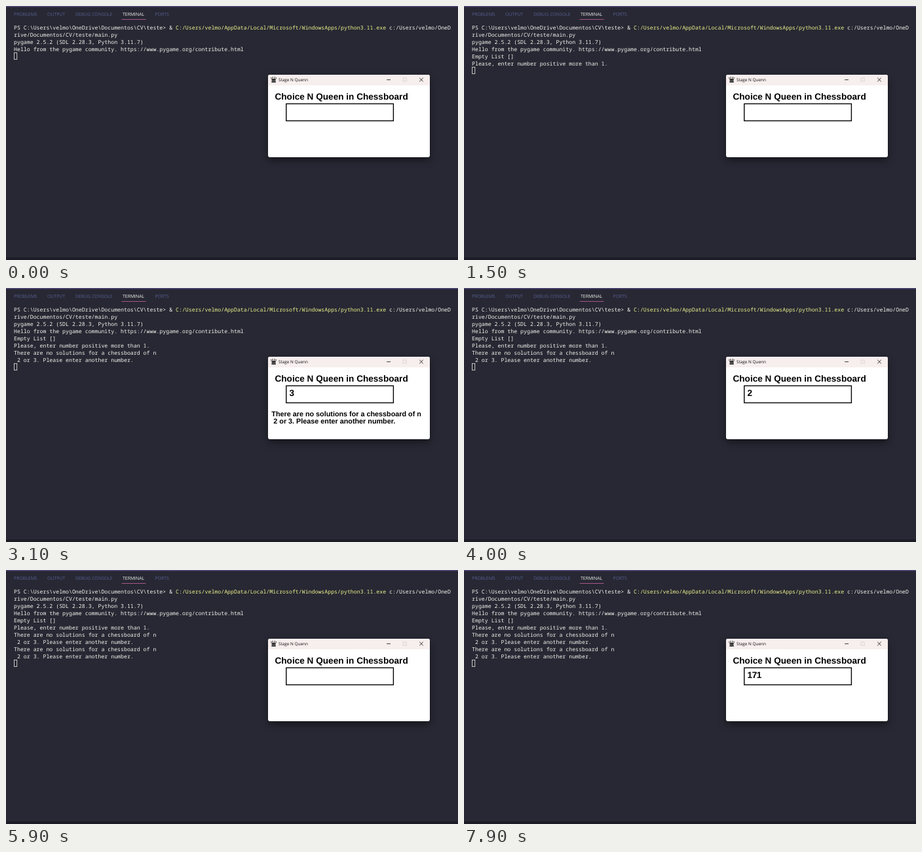
An HTML page for the animation above (8 s loop, 690 by 388 pixels).

```html
<!DOCTYPE html>
<html lang="en">
<head>
<meta charset="utf-8">
<title>N Queen terminal session</title>
<style>
  html, body { margin: 0; width: 100%; height: 100%; overflow: hidden; background: #272833; }
  svg { display: block; width: 690px; height: 388px; }
  text { white-space: pre; text-rendering: geometricPrecision; }
  .tabs { font: 6.9px "Open Sans", "Noto Sans", sans-serif; fill: #565f92; }
  .tabs .active { fill: #f2f2ee; }
  .terminal { font: 8.24px "Noto Sans Mono", "DejaVu Sans Mono", monospace; fill: #f4f4ee; }
  .terminal .command { fill: #eef28d; }
  .caption { font: 6.4px "Open Sans", "Noto Sans", sans-serif; fill: #111; }
  .game { font: bold 13.6px "Liberation Sans", Arial, sans-serif; fill: #000; }
  .game .small { font-size: 10.8px; }
  #entry { letter-spacing: -.5px; }
  .shadow { filter: drop-shadow(0 5px 6px rgba(0, 0, 0, .45)); }
</style>
</head>
<body>
<svg viewBox="0 0 690 388">
  <rect width="690" height="388" fill="#272833"/>
  <rect width="690" height="1.4" fill="#544c80"/>
  <rect y="384" width="690" height="4" fill="#1d1d27"/>

  <g class="tabs">
    <text x="12" y="15.4">PROBLEMS</text>
    <text x="63" y="15.4">OUTPUT</text>
    <text x="106" y="15.4">DEBUG CONSOLE</text>
    <text x="178" y="15.4" class="active">TERMINAL</text>
    <text x="227.5" y="15.4">PORTS</text>
    <rect x="176.5" y="20" width="37" height="1" fill="#a9568a"/>
  </g>

  <g class="terminal">
    <g id="lines"></g>
    <rect id="cursor" x="12.5" width="4.2" height="10" fill="none" stroke="#d8d8d4" stroke-width=".9"/>
  </g>

  <rect class="shadow" x="400" y="105" width="247" height="126" rx="3" fill="#fff"/>
  <path d="M400 121.3V108a3 3 0 0 1 3-3h241a3 3 0 0 1 3 3v13.3z" fill="#f7eeee"/>

  <!-- queen icon -->
  <g fill="#222">
    <path d="M404.8 110.2l1.6 2.2.6-3 1.6 2.6 1.6-2.6.6 3 1.6-2.2-1.1 4.4h-5.4z"/>
    <rect x="405.4" y="115" width="6.4" height="1.8"/>
    <circle cx="404.8" cy="110" r=".8"/>
    <circle cx="407" cy="109" r=".8"/>
    <circle cx="410.2" cy="109" r=".8"/>
    <circle cx="412.4" cy="110" r=".8"/>
  </g>
  <text class="caption" x="416" y="115.2">Stage N Quenn</text>
  <g fill="none" stroke="#222" stroke-width=".9">
    <path d="M581.2 112.7h5.8M631.2 109.8l5.6 5.6m0-5.6l-5.6 5.6"/>
    <rect x="606.2" y="110" width="5" height="5" stroke="#d9d0d0"/>
  </g>

  <g class="game">
    <text x="410.5" y="143.2">Choice N Queen in Chessboard</text>
    <rect x="427.8" y="149.4" width="163.6" height="26" fill="none" stroke="#000" stroke-width="1.4"/>
    <text id="entry" x="432.6" y="165.2"></text>
    <text id="message1" class="small" x="405.3" y="195.8"></text>
    <text id="message2" class="small" x="405.3" y="207"></text>
  </g>
</svg>

<script>
const LOOP = 8000;
const LINE_HEIGHT = 11;
const byId = id => document.getElementById(id);

const intro = [
  'PS C:\\Users\\velmo\\OneDrive\\Documentos\\CV\\teste&gt; &amp; ' +
    '<tspan class="command">C:/Users/velmo/AppData/Local/Microsoft/WindowsApps/python3.11.exe</tspan>' +
    ' c:/Users/velmo/OneD',
  'rive/Documentos/CV/teste/main.py',
  'pygame 2.5.2 (SDL 2.28.3, Python 3.11.7)',
  'Hello from the pygame community. https://www.pygame.org/contribute.html'
];
const emptyList = ['Empty List []', 'Please, enter number positive more than 1.'];
const noSolution = ['There are no solutions for a chessboard of n', ' 2 or 3. Please enter another number.'];

// Each step sets the input text; a message is shown in the window and printed.
const steps = [
  { at: 0, entry: '' },
  { at: 400, entry: '0' },
  { at: 800, entry: '0', message: emptyList },
  { at: 1500, entry: '' },
  { at: 2300, entry: '3' },
  { at: 3000, entry: '3', message: noSolution },
  { at: 3600, entry: '' },
  { at: 4000, entry: '2' },
  { at: 4700, entry: '2', message: noSolution },
  { at: 5900, entry: '' },
  { at: 6400, entry: '1' },
  { at: 6600, entry: '17' },
  { at: 7900, entry: '171' }
];

let shown;

function show(step) {
  const past = steps.slice(0, steps.indexOf(step) + 1);
  const lines = [...intro, ...past.flatMap(s => s.message || [])];
  byId('lines').innerHTML = lines
    .map((line, i) => `<text x="12" y="${35.6 + i * LINE_HEIGHT}">${line}</text>`)
    .join('');
  byId('cursor').setAttribute('y', 27.4 + lines.length * LINE_HEIGHT);

  const [first, second] = step.message || ['', ''];
  byId('entry').textContent = step.entry;
  byId('message1').textContent = first;
  byId('message2').textContent = second;
}

function frame() {
  const time = performance.now() % LOOP;
  const step = steps.filter(s => s.at <= time).pop();
  if (step !== shown) show(shown = step);
  requestAnimationFrame(frame);
}
frame();
</script>
</body>
</html>
```
